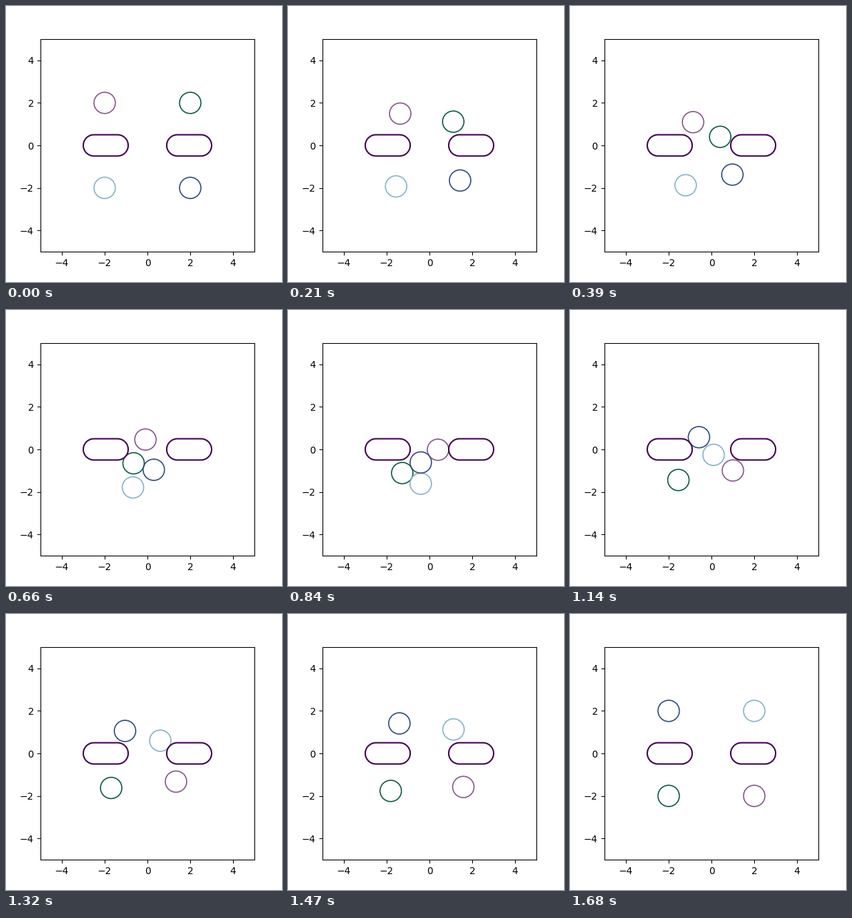
Recreate the animation shown at these times as a matplotlib script. Size 400 px wide and 400 px high, loop 1.71 s.

```python
import numpy as np
import matplotlib.pyplot as plt
from matplotlib.animation import FuncAnimation
from matplotlib.patches import Circle, Polygon

R = 0.5
GAP = 0.998           # closest allowed distance between centres
STEPS = 38
HALF = STEPS // 2
SLOTS, INTERVAL = 57, 30
CAPSULES = [(-2.5, -1.4), (1.4, 2.5)]   # core segments on the x axis
COLORS = ["#86588a", "#0a5c42", "#84b4c8", "#2f4d7c"]

# Each disc swaps corners through the centre and is packed tight halfway
START = np.array([(-2, 2), (2, 2), (-2, -2), (2, -2)])
MEET = np.array([(0.4, -0.016), (-1.272, -1.115),
                 (-0.405, -1.615), (-0.405, -0.615)])


def push(delta):
    """Displacement that lengthens each vector in delta to at least GAP."""
    dist = np.maximum(np.hypot(delta[:, 0], delta[:, 1]), 1e-9)[:, None]
    return delta / dist * np.maximum(GAP - dist, 0)


def pin(paths):
    paths[:, 0], paths[:, HALF], paths[:, -1] = START, MEET, -START


def separate(paths):
    for i in range(len(paths)):
        for j in range(i):
            move = push(paths[i] - paths[j]) / 2
            paths[i] += move
            paths[j] -= move
    for p in paths:
        for lo, hi in CAPSULES:
            core = np.column_stack([np.clip(p[:, 0], lo, hi), np.zeros(len(p))])
            p += push(p - core)
    pin(paths)


def plan(rounds=2500):
    """Tighten the paths like elastic bands while keeping the discs apart."""
    first = np.linspace(START, MEET, HALF + 1, axis=1)
    second = np.linspace(MEET, -START, HALF + 1, axis=1)
    paths = np.concatenate([first, second[:, 1:]], axis=1)
    for _ in range(rounds):
        mean = (paths[:, :-2] + paths[:, 2:]) / 2
        paths[:, 1:-1] += 0.5 * (mean - paths[:, 1:-1])
        pin(paths)
        separate(paths)
    return paths


def capsule(lo, hi):
    a = np.linspace(-np.pi / 2, np.pi / 2, 40)
    arc = np.column_stack([R * np.cos(a), R * np.sin(a)])
    outline = np.concatenate([arc + (hi, 0), -arc + (lo, 0)])
    return Polygon(outline, fill=False, ec="#440154", lw=1.5, zorder=2)


paths = plan()

fig, ax = plt.subplots(figsize=(4, 4), dpi=100)
ax.set_xlim(-5, 5)
ax.set_ylim(-5, 5)
for lo, hi in CAPSULES:
    ax.add_patch(capsule(lo, hi))
discs = [ax.add_patch(Circle(p[0], R, fill=False, ec=c, lw=1.2))
         for p, c in zip(paths, COLORS)]


def update(slot):
    step = slot - slot // 3   # every second step is held for two slots
    for disc, p in zip(discs, paths):
        disc.center = p[step]
    return discs


anim = FuncAnimation(fig, update, frames=SLOTS, interval=INTERVAL,
                     repeat=True, repeat_delay=0)
plt.show()
```
